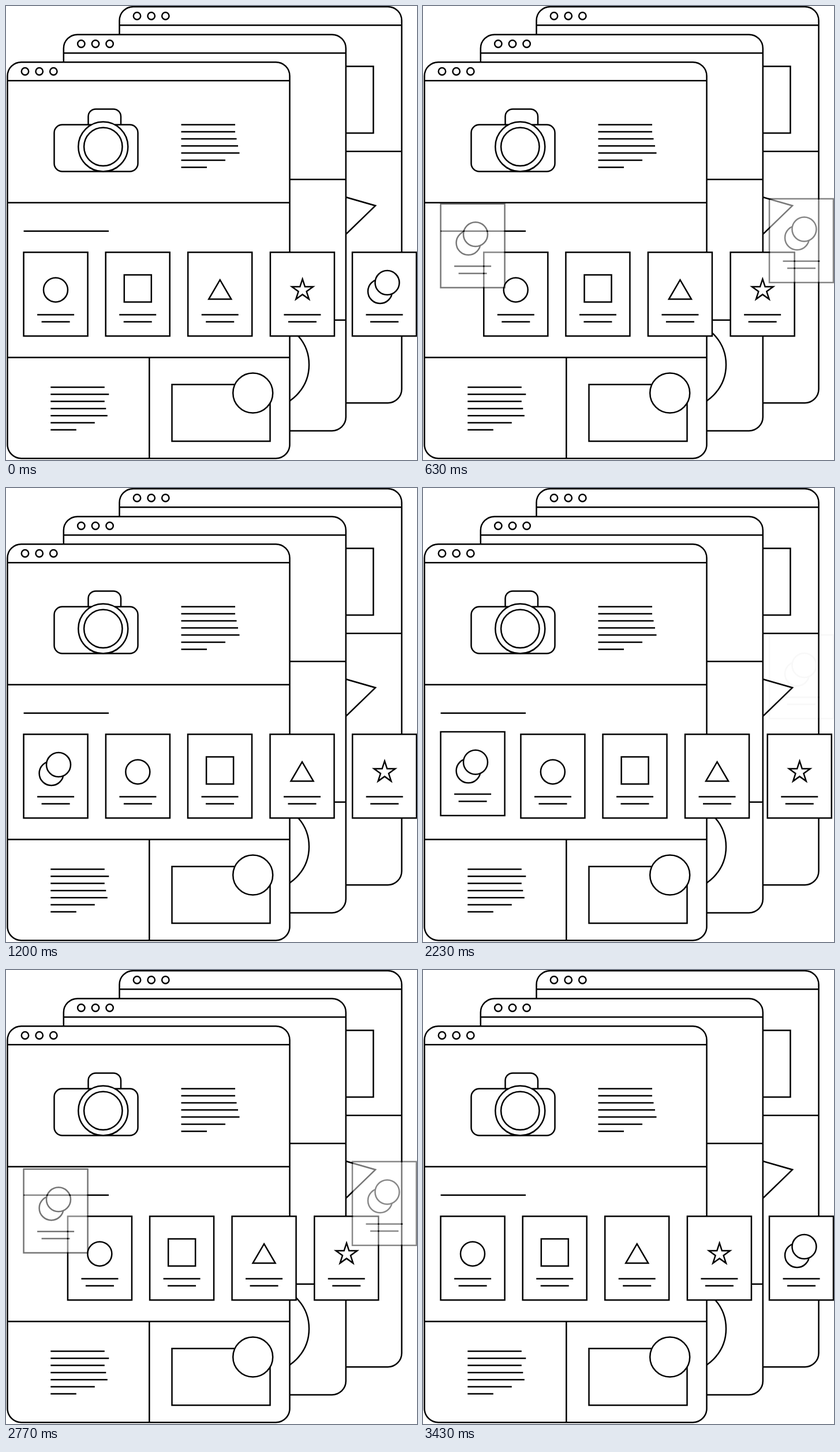
An HTML page that plays this animation: 712x786 px, repeating every 4.73 s.

```html
<!DOCTYPE html>
<html lang="en">
<head>
<meta charset="utf-8">
<title>Carousel wireframe</title>
<style>
  html, body { margin: 0; width: 100%; height: 100%; overflow: hidden; background: #fff; }
  svg { display: block; width: 100%; height: 100%; }
</style>
</head>
<body>
<svg viewBox="0 0 712 786" fill="#fff" stroke="#000" stroke-width="2.5">
  <defs>
    <g id="window">
      <rect width="489" height="686" rx="24"/>
      <path d="M0 32H489"/>
      <circle cx="30.5" cy="16.1" r="6.2"/>
      <circle cx="55.2" cy="16.1" r="6.2"/>
      <circle cx="79.8" cy="16.1" r="6.2"/>
    </g>
    <g id="card">
      <rect width="111" height="145"/>
      <path d="M23.5 108H87.5M31 120.3H80"/>
    </g>
    <g id="pair">
      <use href="#card"/>
      <circle cx="48" cy="67.5" r="21"/>
      <circle cx="60.4" cy="52.7" r="21"/>
    </g>
  </defs>

  <!-- back window -->
  <use href="#window" x="196.5" y="1.2"/>
  <path d="M196.5 251.8H685.5"/>
  <rect x="400" y="104.5" width="236.4" height="115.5"/>
  <path d="M540 317L640 345.7L540 442.5Z"/>

  <!-- middle window -->
  <use href="#window" x="99.8" y="49.4"/>
  <path d="M99.8 300.2H588.8M99.8 543.7H588.8"/>
  <circle cx="450" cy="621" r="75"/>

  <!-- front window -->
  <use href="#window" x="2.5" y="97.2"/>
  <path d="M2.5 340.5H491.5M2.5 608.4H491.5M248.3 608.4V783M30.6 389.7H178"/>
  <rect x="142.5" y="178.4" width="56.5" height="60" rx="13"/>
  <rect x="83.5" y="205.5" width="145" height="81" rx="14"/>
  <circle cx="168.3" cy="243.6" r="43"/>
  <circle cx="168.3" cy="243.6" r="33.2"/>
  <path id="text"/>
  <rect x="287.5" y="655.3" width="170" height="98.2"/>
  <circle cx="427.7" cy="670" r="34.5"/>

  <g id="row">
    <g transform="translate(30.6 426.4)">
      <use href="#card"/>
      <circle cx="55.4" cy="65" r="21"/>
    </g>
    <g transform="translate(172.7 426.4)">
      <use href="#card"/>
      <rect x="32.1" y="39.1" width="47" height="47"/>
    </g>
    <g transform="translate(315.2 426.4)">
      <use href="#card"/>
      <path d="M55.5 47.8L75 81.2H36Z"/>
    </g>
    <g transform="translate(457.9 426.4)">
      <use href="#card"/>
      <path id="star"/>
    </g>
  </g>
  <use id="left" href="#pair"/>
  <use id="right" href="#pair"/>
</svg>
<script>
const CARD_Y = 426.4, STEP = 142.3, DROP = 176.4;
const FORWARD = 1200, BACK_START = 2200, BACK = 1230, LOOP = 4730, TICK = 30;
const get = id => document.getElementById(id);

const paragraph = (x, y, widths) =>
  widths.map((w, i) => `M${x} ${y + i * 12.3}h${w}`).join('');

get('text').setAttribute('d',
  paragraph(303.5, 205.4, [93.5, 93.5, 96, 98.5, 101, 76.5, 44.5]) +
  paragraph(77.3, 660, [93.5, 101, 93.5, 96, 98.5, 76.5, 44.5]));

const starPoints = Array.from({ length: 10 }, (_, i) => {
  const r = i % 2 ? 7.4 : 19.3, a = i * Math.PI / 5;
  return `${55.7 + r * Math.sin(a)} ${65.6 - r * Math.cos(a)}`;
});
get('star').setAttribute('d', `M${starPoints.join('L')}Z`);

const ticks = ms => Math.floor(ms / TICK) * TICK;

function progress(t) {
  if (t < BACK_START) return Math.min(1, ticks(t) / FORWARD);
  return Math.max(0, 1 - ticks(t - BACK_START) / BACK);
}

function place(id, x, visible) {
  const card = get(id);
  card.setAttribute('transform', `translate(${x} ${CARD_Y - DROP * (1 - visible)})`);
  card.setAttribute('opacity', visible);
}

function draw(now) {
  const p = progress(now % LOOP);
  get('row').setAttribute('transform', `translate(${STEP * p} 0)`);
  place('left', 30.6, p);
  place('right', 600, 1 - p);
  requestAnimationFrame(draw);
}
draw(0);
</script>
</body>
</html>
```
